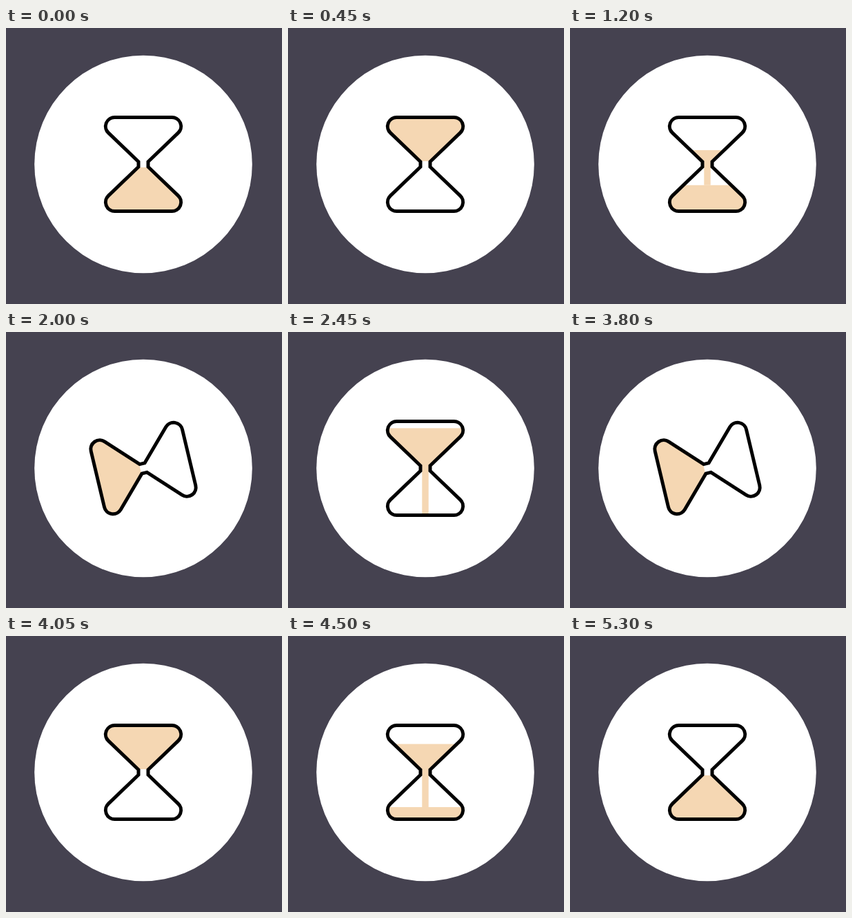
An HTML page with a canvas that plays this animation: 400x400 px, repeating every 5400 ms.

```html
<!DOCTYPE html>
<html lang="en">
<head>
<meta charset="utf-8">
<title>Hourglass</title>
<style>
  html, body { margin: 0; width: 100%; height: 100%; overflow: hidden; background: #454250; }
  canvas { display: block; width: 400px; height: 400px; }
</style>
</head>
<body>
<canvas id="stage"></canvas>
<script>
const CYCLE = 1800, STEP = 50, FLIP = 438;
const CX = 199, CY = 197.5;
const SAND = '#f5d7b3';
const NECK_TOP = 193, NECK_END = 202, FLOOR = 266;

const canvas = document.getElementById('stage');
const scale = window.devicePixelRatio || 1;
canvas.width = canvas.height = 400 * scale;
const ctx = canvas.getContext('2d');

const clamp = (v, lo, hi) => Math.min(hi, Math.max(lo, v));

// cubic-bezier(.42, 0, .58, 1), solved by bisection
function easeInOut(x) {
  let lo = 0, hi = 1;
  for (let i = 0; i < 24; i++) {
    const s = (lo + hi) / 2, r = 1 - s;
    if (1.26 * r * r * s + 1.74 * r * s * s + s * s * s < x) lo = s;
    else hi = s;
  }
  return lo * lo * (3 - 2 * lo);
}

// Outline relative to the centre: two rounded triangles joined by a neck
function glassPath() {
  const path = new Path2D();
  const neckX = 7, neckY = 3.8, baseX = 74, baseY = 68, r = 13;
  path.moveTo(-neckX, -neckY);
  path.arcTo(-baseX, -baseY, baseX, -baseY, r);
  path.arcTo(baseX, -baseY, neckX, -neckY, r);
  path.lineTo(neckX, -neckY);
  path.lineTo(neckX, neckY);
  path.arcTo(baseX, baseY, -baseX, baseY, r);
  path.arcTo(-baseX, baseY, -neckX, neckY, r);
  path.lineTo(-neckX, neckY);
  path.closePath();
  return path;
}
const glass = glassPath();

function fillBand(x, w, from, to) {
  if (to > from) ctx.fillRect(x - CX, from - CY, w, to - from);
}

function drawSand(p) {
  ctx.fillStyle = SAND;
  if (p < FLIP) {
    fillBand(99, 200, NECK_END, FLOOR);
    return;
  }
  const top = Math.max(129, 156.5 + 0.0685 * (p - 900));
  const bottom = clamp(248 - 0.0675 * (p - 900), NECK_END, FLOOR);
  const tip = NECK_TOP + (FLOOR - NECK_TOP) * clamp((p - 480) / 100, 0, 1);
  fillBand(99, 200, top, NECK_TOP);
  fillBand(194.3, 9.4, Math.max(top, NECK_TOP), Math.min(tip, bottom));
  fillBand(99, 200, bottom, FLOOR);
}

function draw(time) {
  const p = Math.floor(time / STEP) * STEP % CYCLE;
  ctx.setTransform(scale, 0, 0, scale, 0, 0);
  ctx.fillStyle = '#454250';
  ctx.fillRect(0, 0, 400, 400);
  ctx.fillStyle = '#fff';
  ctx.beginPath();
  ctx.arc(CX, CY, 157.8, 0, Math.PI * 2);
  ctx.fill();

  ctx.translate(CX, CY);
  if (p < FLIP) ctx.rotate(Math.PI * easeInOut(p / FLIP));
  ctx.save();
  ctx.clip(glass);
  drawSand(p);
  ctx.restore();
  ctx.strokeStyle = '#000';
  ctx.lineWidth = 5;
  ctx.stroke(glass);
}

const start = performance.now();
function tick() {
  draw(performance.now() - start);
  requestAnimationFrame(tick);
}
tick();
</script>
</body>
</html>
```
